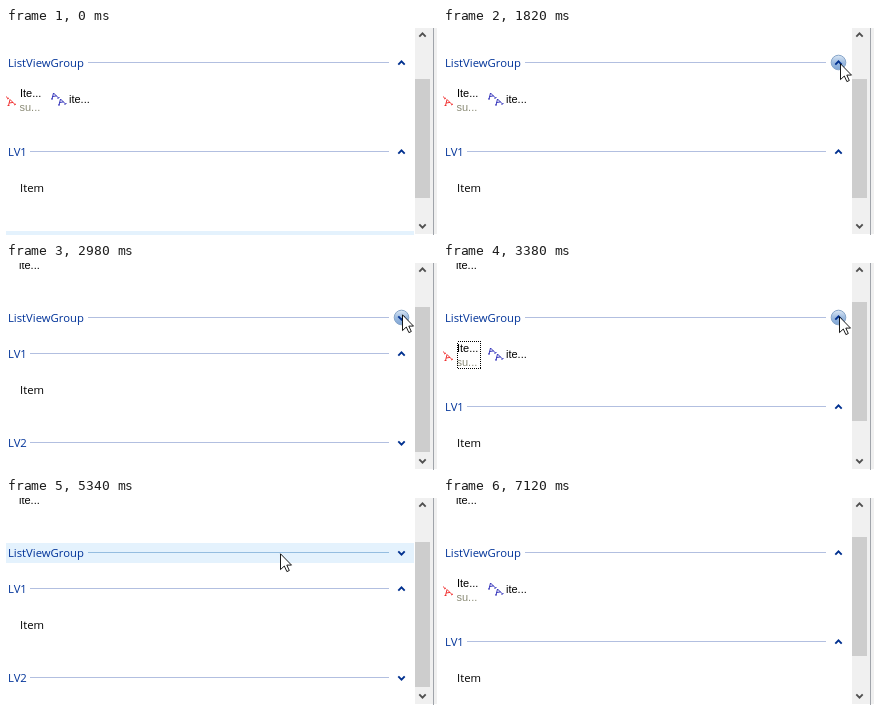
These frames come from a looping animation (431 px wide and 207 px high, 7.24 s). An HTML page:

```html
<!DOCTYPE html>
<html lang="en">
<head>
<meta charset="utf-8">
<title>Collapsible list view groups</title>
<style>
  html, body { margin: 0; width: 100%; height: 100%; overflow: hidden; background: #fff; }
  svg { display: block; }
  text { font: 11.3px "Open Sans", "Noto Sans", sans-serif; }
  .head { fill: #039; }
  .small { font: 11px "Liberation Sans", Arial, sans-serif; }
  .crisp { shape-rendering: crispEdges; }
  .line { fill: none; }
</style>
</head>
<body>
<svg width="431" height="207" viewBox="0 0 431 207">
  <defs>
    <linearGradient id="glow" x2="0" y2="1">
      <stop stop-color="#dce8f5"/>
      <stop offset=".5" stop-color="#9dbbe0"/>
      <stop offset="1" stop-color="#7fa6d6"/>
    </linearGradient>
  </defs>
  <g id="view"></g>
</svg>
<script>
const LOOP = 7240, TICK = 77, PRESS = 85;
const view = document.getElementById('view');

// The pointer starts below the stage and makes eased moves in ticks.
const start = { x: 380, y: 207 };
const moves = [
  { at: 660, steps: 10, x: 399, y: 60 },
  { at: 1432, steps: 6, x: 397, y: 35 },
  { at: 2520, steps: 4, x: 396, y: 46 },
  { at: 2980, steps: 2, x: 396, y: 53 },
  { at: 3700, steps: 4, x: 279, y: 53 },
  { at: 4950, steps: 1, x: 274, y: 55 },
  { at: 6030, steps: 10, x: 290, y: 207 }
];
const presses = [1990, 3150, 4320, 4550, 5250, 5480];
const toggles = [2140, 3380, 4640, 5560];

function pointer(t) {
  let { x, y } = start;
  for (const m of moves) {
    if (t < m.at) break;
    const p = Math.min(1, (Math.floor((t - m.at) / TICK) + 1) / m.steps);
    const e = 1 - (1 - p) ** 1.7;
    x = Math.round(x + (m.x - x) * e);
    y = Math.round(y + (m.y - y) * e);
  }
  return { x, y };
}

const label = (s, x, y, cls = '', fill = '') =>
  `<text x="${x}" y="${y}" class="${cls}"${fill && ` fill="${fill}"`}>${s}</text>`;

const rect = (x, y, w, h, fill) =>
  `<rect class="crisp" x="${x}" y="${y}" width="${w}" height="${h}" fill="${fill}"/>`;

function chevron(x, y, up, color) {
  const d = up ? -3.2 : 3.2;
  return `<path class="line" stroke="${color}" stroke-width="1.9"
    d="M${x - 3.2} ${y - d / 2}l3.2 ${d}l3.2 ${-d}"/>`;
}

function header(name, y, lineX, open, at) {
  const over = at.x < 408 && Math.abs(at.y - y) <= 10;
  const onButton = over && Math.hypot(at.x - 395, at.y - y) <= 8.5;
  const lit = over && !onButton;
  return (lit ? rect(0, y - 10, 408, 20, '#e4f2fd') : '') +
    label(name, 2, y + 4, 'head') +
    rect(lineX, y - 1, 383 - lineX, 1, lit ? '#94bde0' : '#b2bfe0') +
    (onButton ? `<circle cx="395.5" cy="${y - .5}" r="7.3" fill="url(#glow)" stroke="#86a5c9"/>` : '') +
    chevron(395.5, y, open, '#00308f');
}

// Two slanted letters, the second one lower right
function icon(x, y, color) {
  const letter = (dx, dy) => `<path class="line" stroke="${color}" stroke-width=".9"
    transform="translate(${x + dx} ${y + dy})" d="M.5 6.5L2 .5L7 5.5M1.2 4L5 3.4M-.5 6.5h2M6 6l2-1"/>`;
  return letter(0, 0) + letter(7, 6);
}

function items(y, focused) {
  const box = `<rect class="crisp" x="14.5" y="${y + 23.5}" width="23" height="27"
    fill="none" stroke="#000" stroke-dasharray="1 1"/>`;
  return icon(-5, y + 30, '#f02020') + icon(45.5, y + 29.5, '#2020b4') +
    label('Ite...', 14, y + 34, 'small') +
    label('su...', 13.5, y + 48, 'small', '#8b8b76') +
    label('ite...', 63, y + 40, 'small') +
    (focused ? box : '');
}

function scrollbar(top, height) {
  const arrow = (y, up) => chevron(416.5, y, up, '#505050');
  return rect(409, 0, 22, 206, '#f0f0f0') + rect(427, 0, 1, 207, '#a0a4aa') +
    rect(409, top, 15, height, '#cdcdcd') + arrow(7, true) + arrow(198, false);
}

function cursor({ x, y }, pressed) {
  return (pressed ? `<circle cx="${x}" cy="${y}" r="12" fill="#ff0" fill-opacity=".47"/>` : '') +
    `<path transform="translate(${x} ${y})" fill="#fff" stroke="#000" stroke-width=".9"
      d="M.5 .8V16.6L4.3 13L6.9 18.6L9.3 17.5L6.8 12.1H11.5Z"/>`;
}

function scene(t) {
  const at = pointer(t);
  const toggled = toggles.filter(s => s <= t).length;
  const open = toggled % 2 === 0;
  const y = toggled ? 55 : 35;
  const next = y + (open ? 89 : 36);
  const focused = toggled > 1 && t < 7120;
  const thumb = open ? 119 : 145;
  const top = !open ? 44 : toggled ? 39 : 51;
  return label('ite...', 13, y - 49, 'small') +
    header('ListViewGroup', y, 82, open, at) +
    (open ? items(y, focused) : '') +
    header('LV1', next, 24, true, at) +
    label('Item', 14, next + 40) +
    header('LV2', next + 89, 24, false, at) +
    scrollbar(top, thumb) +
    cursor(at, presses.some(s => t >= s && t < s + PRESS));
}

let shown;
function draw(now) {
  const next = scene(now % LOOP);
  if (next !== shown) view.innerHTML = shown = next;
  requestAnimationFrame(draw);
}
draw(0);
</script>
</body>
</html>
```
